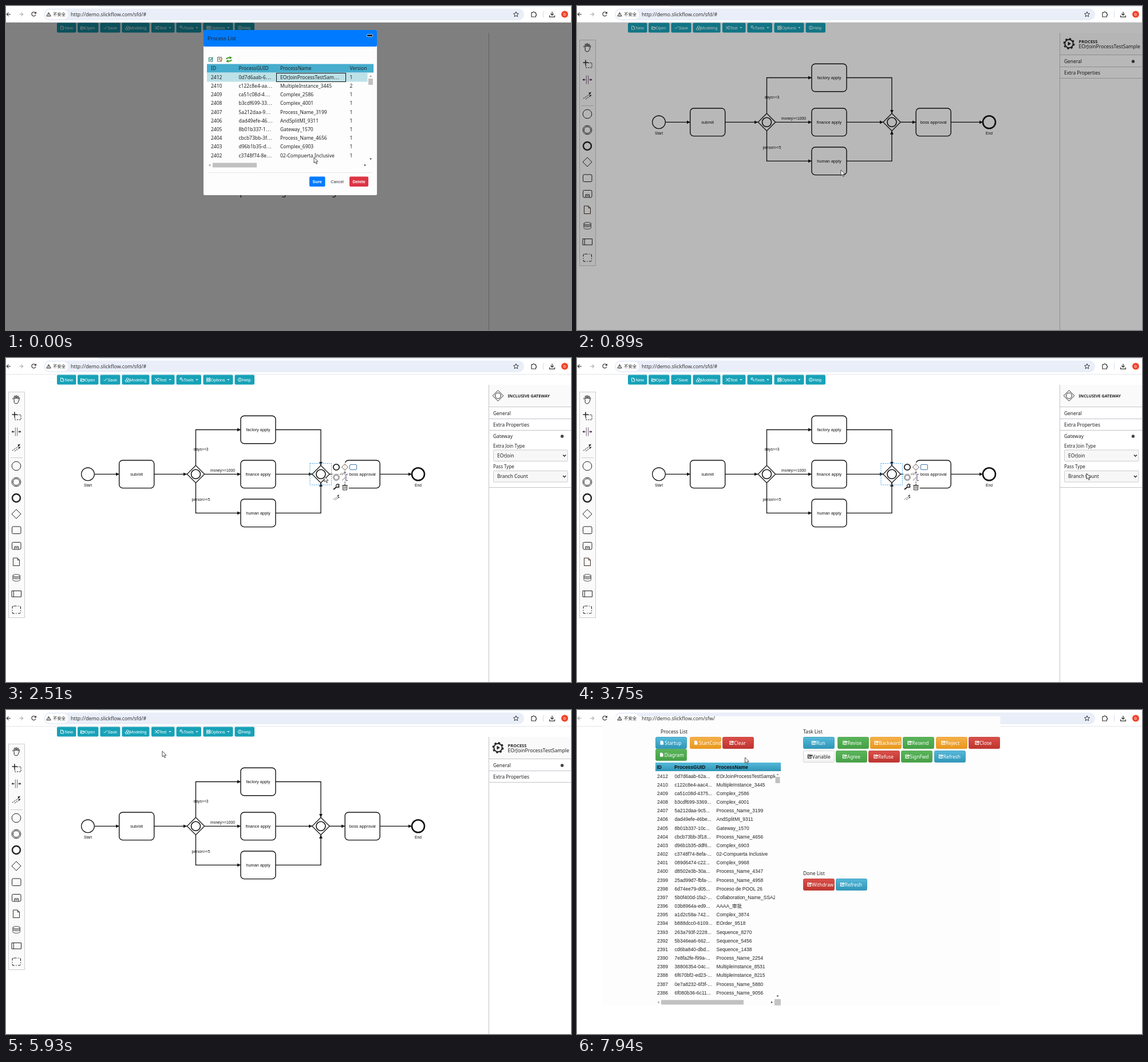
Write an HTML page that moves like this. It is 987 px wide and 567 px high and loops after 8 s.

```html
<!DOCTYPE html>
<html lang="en">
<head>
<meta charset="utf-8">
<title>Process designer</title>
<style>
html, body { margin: 0; width: 100%; height: 100%; overflow: hidden; background: #fff; }
#stage { display: block; width: 987px; height: 567px; }
text { font-family: "Noto Sans", "Noto Sans CJK SC", sans-serif; white-space: pre; }
.arial { font-family: "Liberation Sans", "Noto Sans CJK SC", Arial, sans-serif; }
</style>
</head>
<body>
<svg id="stage" viewBox="0 0 987 567"></svg>
<script>
const rect = (x, y, w, h, fill, more = '') =>
  `<rect x="${x}" y="${y}" width="${w}" height="${h}" fill="${fill}" ${more}/>`;
const path = (d, stroke = '#222', width = 1, fill = 'none', more = '') =>
  `<path d="${d}" stroke="${stroke}" stroke-width="${width}" fill="${fill}" ${more}/>`;
const solid = (d, fill = '#222') => path(d, 'none', 0, fill);
const ring = (x, y, r, width = 1, stroke = '#222', fill = 'none', more = '') =>
  `<circle cx="${x}" cy="${y}" r="${r}" stroke="${stroke}" stroke-width="${width}" fill="${fill}" ${more}/>`;
const text = (x, y, s, size = 8.4, fill = '#222', more = '') =>
  `<text x="${x}" y="${y}" font-size="${size}" fill="${fill}" ${more}>${s.replace(/>/g, '&gt;')}</text>`;
const arial = (x, y, s, size = 7.3, fill = '#222', more = '') =>
  text(x, y, s, size, fill, 'class="arial" ' + more);
const middle = 'text-anchor="middle"';
const group = (id, body, more = '') => `<g id="${id}" ${more}>${body}</g>`;
const at = (x, y, body) => `<g transform="translate(${x} ${y})">${body}</g>`;
const line = (color, d) => path(d, color, 1);
const diamond = (x, y, r, width) =>
  path(`M${x - r} ${y}L${x} ${y - r}L${x + r} ${y}L${x} ${y + r}Z`, '#222', width, '#fff');
const chevron = (x, y) => path(`M${x - 2.5} ${y - 1.5}l2.5 2.5l2.5 -2.5`, '#222', 1.4);
const tri = (x, y, dx, dy, fill = '#555') => // small arrow pointing along (dx, dy)
  solid(`M${x + dx * 2} ${y + dy * 2}L${x - dx - dy * 2} ${y - dy - dx * 2}L${x - dx + dy * 2} ${y - dy + dx * 2}Z`, fill);

// ---- browser bar
const urlText = id =>
  path('M74.500 11.300l3.600 6.400h-7.200z', '#222', 1) + path('M74.500 13.300v2.200M74.500 16.200v.7', '#222', .8) +
  text(82, 17.4, '不安全', 7.4) + text(113, 17.6, 'http://demo.slickflow.com/', 8.83, '#333') +
  text(223.5, 17.6, id, 8.83, '#333');
const reload = path('M51.600 12.200a3.600 3.600 0 1 0 .3 3.200M52.300 10.200v2.600h-2.600', '#333', 1.2);
const browser =
  rect(0, 0, 987, 29, '#fff') + rect(0, 28, 987, 1, '#e3e5e9') + rect(66, 4.5, 839, 20.5, '#e9eef8', 'rx="10"') +
  rect(68, 6.5, 40, 16.5, '#fff', 'rx="8"') +
  group('back', path('M8 14.500H1.500M4.500 11.300L1.300 14.500l3.200 3.200', 'currentColor', 1.2)) +
  path('M23 14.500h6.500M26.500 11.300l3.200 3.200l-3.200 3.200', '#aaa', 1.1) +
  path('M891 10l1.300 3l3.200.3l-2.400 2.100l.7 3.200l-2.800 -1.700l-2.800 1.700l.7 -3.200l-2.400 -2.100l3.200 -.3z', '#333', 1) +
  path('M918 11.500h2.300a1.500 1.500 0 0 1 3 0h2.200v2.500a1.300 1.300 0 0 1 0 2.600v2.400h-7.500z', '#333', 1.2) +
  rect(938, 9, 1, 11, '#cfdcf3') +
  path('M954 10v6M951.300 13.500l2.700 2.700l2.700 -2.700M949.500 16.500v2.700h9v-2.700', '#333', 1.2) +
  ring(976, 14.500, 6, 0, 'none', '#f2452c') + text(976, 17, 'b', 7, '#fff', middle);
const bars = group('barA', rect(162, 0, 825, 1, '#dbe6f8') + urlText('sfd/#') + reload) +
  group('barB', rect(0, 0, 162, 1, '#d3e3fd') + rect(307, 0, 680, 1, '#d3e3fd') + urlText('sfw/') +
    path('M45.500 11.500l6 6M51.500 11.500l-6 6', '#333', 1.2));

// ---- application toolbar
const toolIcons = [
  'M0 -3h3l2 2v4h-5zM3 -3v2h2', 'M0 3v-5h2l1 1h3v1M0 3l1.500 -3h5.500l-1.500 3z', 'M0 0l2 2l4 -4.500',
  'M3.500 -3l2 1v2l-2 1l-2 -1v-2zM1.500 0l2 1v2l-2 1l-2 -1v-2zM5.500 0l2 1v2l-2 1l-2 -1v-2z',
  'M0 -2h1.500l3 4h2M0 2h1.500l3 -4h2M5.500 -3l1.200 1l-1.200 1M5.500 1l1.200 1l-1.200 1',
  'M0 -1.500a1.500 1.500 0 0 0 2.500 1l3 3l1 -1l-3 -3a1.500 1.500 0 0 0 -2 -2l.5 1.500z',
  'M0 -3h2.500v2.500h-2.500zM3.800 -3h2.500v2.500h-2.500zM0 .7h2.500v2.500h-2.500zM3.800 .7h2.500v2.500h-2.500z',
  'M0 0a3 3 0 1 1 6 0a3 3 0 1 1 -6 0M3 -.5v2.300M3 -1.800v.8'];
const tools = [['New', 89, 33.5, 102.5], ['Open', 125, 36.5, 137.5], ['Save', 164.5, 35, 177.5],
  ['Modeling', 202.5, 48, 216], ['Test', 254, 40.5, 267, 286.5], ['Tools', 297.5, 43.5, 310.5, 333.5],
  ['Options', 344.5, 52, 357.5, 388.5], ['Help', 399.5, 34.5, 412.5]];
const toolbar = tools.map(([name, x, w, tx, caret], i) =>
  rect(x, 29.5, w, 17, '#17a2b8', `rx="2" id="tool${name}"`) +
  at(tx - 7, 38, path(toolIcons[i], '#fff', .9)) + arial(tx, 40.6, name, 7.3, '#fff') +
  (caret ? solid(`M${caret - 2} 37h4l-2 2.200z`, '#fff') : '')).join('');

// ---- process diagram
const task = (x, y, label) => rect(x - 30.5, y - 24.3, 61, 48.6, '#fff', 'rx="6.100" stroke="#111" stroke-width="1.400"') +
  arial(x, y + 2.5, label, 7.4, '#111', middle);
const gateway = x => diamond(x, 203.3, 15.2, 1.4) + ring(x, 203.3, 8, 1.6, '#111');
const label = (x, y, s) => arial(x, y, s, 6.7, '#111', middle);
const flows = ['M154.500 203.300H198', 'M258.500 203.300H316', 'M331.500 188V125.500H410', 'M346.700 203.300H410',
  'M331.500 218.500V271.300H410', 'M471 125.500H550V188', 'M471 203.300H535', 'M471 271.300H550V218.500',
  'M565 203.300H592', 'M653 203.300H709'];
const diagram = flows.map(d => path(d, '#111', 1.35, 'none', 'marker-end="url(#head)"')).join('') +
  ring(143, 203.3, 11.3, 1.3, '#111', '#fff') + ring(720, 203.3, 11, 2.6, '#111', '#fff') +
  task(228.2, 203.3, 'submit') + task(440.5, 125.5, 'factory apply') + task(440.5, 203.3, 'finance apply') +
  task(440.5, 271.3, 'human apply') + task(622.7, 203.3, 'boss approval') + gateway(331.5) + gateway(550) +
  label(340.7, 161.5, 'days>=3') + label(378.5, 198.7, 'money>=1000') + label(340.5, 249.5, 'person>=5') +
  label(143, 224.7, 'Start') + label(720, 224.7, 'End');

const connect = path('M-7 5L5 -3M-3 6L6 0', '#222', 1, 'none', 'stroke-dasharray="2.500 1"') +
  solid('M7 -6.500l-5 1.500l2.500 3zM7.500 -1.500l-4 .5l2 2.800z');
const palette = rect(4.5, 59.5, 28, 395, '#fafafa', 'stroke="#ccc"') + line('#ccc', 'M8 174.500h21') +
  at(18, 73, path('M-3.500 1l-2.500 -2.500c-1 -1 .5 -2 1.300 -1.200l2 1.700l-1.200 -4.500c0 -1.400 1.500 -1.400 1.800 -.3l1 3.800v-4.700c.2 -1.200 1.700 -1.200 1.800 0l.2 4.700l1.200 -4c.5 -1 1.700 -.7 1.600 .4l-.7 4.600l1.400 -2.400c.7 -.8 1.800 0 1.400 1l-2.300 6.400q-1 3 -4 3q-2.500 0 -3.500 -3z', '#222', 1)) +
  at(18, 101, path('M-3 -6.500v9M-7.500 -2h9', '#222', 1.5) + path('M1 -1.500H8V7H-2.500V2', '#222', 1, 'none', 'stroke-dasharray="2.500 1.500"')) +
  at(18, 129, path('M-1.700 -7.500v15M1.700 -7.500v15', '#7c5c7c', 1) + path('M-7 0h4M7 0h-4', '#222', 1.2) + tri(-6.5, 0, -1, 0, '#222') + tri(6.5, 0, 1, 0, '#222')) +
  at(18, 157, connect) + ring(18, 189, 7.8) + ring(18, 217, 7.8) + ring(18, 217, 5.8) + ring(18, 245, 7, 2.4) +
  path('M10 273l8 -8l8 8l-8 8z') + rect(10.5, 295, 15.5, 12.5, 'none', 'rx="2" stroke="#222"') +
  rect(10.5, 322.5, 15.5, 12.5, 'none', 'rx="2" stroke="#222"') + path('M15 334.500v-4.500h6.500v4.500M16.500 332.300h3.500') +
  path('M12.500 350h7.500l3.500 3.500v10h-11zM20 350v3.500h3.500', '#3a2a22') +
  path('M12 380.500a6.200 2 0 0 1 12.400 0v8a6.200 2 0 0 1 -12.400 0zM12 380.500a6.200 2 0 0 0 12.400 0M12 382.500a6.200 2 0 0 0 12.400 0M12 384.500a6.200 2 0 0 0 12.400 0', '#222', .8) +
  path('M10 407.500h16.500v10.500h-16.500zM13.300 407.500v10.500') +
  rect(11, 434, 14.5, 13, 'none', 'rx="2.500" stroke="#222" stroke-width="1.100" stroke-dasharray="5 2.300 1.500 2.300"');

const padTile = (x, y, body) => rect(x - 7, y - 8, 14, 16, '#fff', 'opacity=".85"') + at(x, y, body);
const outline = rect(531, 184.5, 37.5, 37.5, 'none', 'stroke="#4aa3e8" stroke-dasharray="2.200 1.500"');
const pad = padTile(577, 191, ring(0, 0, 5.2, 1.8)) + padTile(592, 191, path('M-5.500 0l5.500 -5.500l5.500 5.500l-5.500 5.500z', '#543', .9)) +
  padTile(606.5, 191, rect(-6, -4.5, 12, 9, '#fff', 'rx="1.500" stroke="#47a"')) +
  padTile(577, 209, ring(0, 0, 5.4, 1, '#777') + ring(0, 0, 3.9, 1, '#777')) +
  padTile(592, 209, path('M5 -5.500h-3v11h3', '#648', 1) + path('M-5 5l6 -5M-5 -5l3 -3M0 -10v4', '#222', 1, 'none', 'stroke-dasharray="1.500 1"')) +
  padTile(577, 226, path('M-5 4l5 -4', '#222', 2.2) + path('M5 -4a3 3 0 1 0 .3 3l-2.300 -.5z', '#222', 1.3)) +
  padTile(592, 226, path('M-3.500 -2.500h7v7.500h-7zM-5 -3h10M-1.500 -4.800h3M-1.200 -1v4.500M1.200 -1v4.500', '#222', .9)) +
  padTile(577, 244, `<g transform="scale(.75)">${connect}</g>`);

// ---- properties panel
const dot = y => ring(971.5, y, 2.7, 0, 'none', '#444');
const panelBase = rect(844, 47, 143, 520, '#fff') + rect(844, 47, 143, 38, '#fafafa') +
  line('#c4c4cc', 'M843.500 47V567M844 85.500H987M844 106.500H987M844 126.500H987') + text(851, 99.8, 'General') + text(851, 120, 'Extra Properties');
const bold = 'font-weight="700"';
const processPanel = ring(859.5, 66, 7.2, 2) + ring(859.5, 66, 8.9, 2, '#222', 'none', 'stroke-dasharray="3.500 3.490"') +
  solid('M857.500 62.500v7l5.500 -3.500z') + text(876.5, 65, 'PROCESS', 7.5, '#222', bold) +
  text(876.5, 74.3, 'EOrJoinProcessTestSample', 8.6) + dot(97);
const select = (y, s) => rect(851.5, y, 129.5, 19.5, '#f7f7f7', 'rx="1" stroke="#ccc"') +
  text(858, y + 12.8, s) + chevron(975.5, y + 10);
const gatewayPanel = diamond(859.5, 66, 9.3, 1) + ring(859.5, 66, 5) + text(876.5, 68.8, 'INCLUSIVE GATEWAY', 7.2, '#222', bold) +
  text(851, 140, 'Gateway') + dot(137) + text(851, 157, 'Extra Join Type', 8) + select(161, 'EOrJoin') +
  text(851, 193.3, 'Pass Type', 8) + select(197.5, 'Branch Count') + line('#c4c4cc', 'M844 226.500H987');
const options = rect(851.5, 197.5, 129.5, 19.5, '#e3f0fb', 'stroke="#4aa0d8"') + text(858, 210.3, 'Branch Count') + chevron(975.5, 207.5) +
  rect(852, 218, 131, 52, '#000', 'opacity=".12"') + rect(851.5, 217.5, 129.5, 51, '#e5f1fb', 'stroke="#567"') +
  rect(852, 234.5, 128.5, 17, '#0a63d3') + text(858, 229.3, '--Choose--') +
  text(858, 246.3, 'Branch Count', 8.4, '#fff') + text(858, 263.2, 'Branch Forced');

const menu = rect(254.5, 48.5, 72, 48.5, '#fff', 'rx="2" stroke="#ddd"') + rect(255, 52, 71, 14.500, '#e9ecef', 'id="menuHover"') +
  line('#e6e6e6', 'M255 72.500h71') + arial(265, 62, 'Simulation Test', 7.25) + arial(265, 88, 'Demo »', 7.25);

// ---- process table shared by the dialog and the test page
const rows = `0d7d6aab-62a EOrJoinProcessTestSample|c122c8e4-aac4 MultipleInstance_3445|ca51c08d-4375 Complex_2586
b3cdf699-3369 Complex_4001|5a212daa-9c5 Process_Name_3199|dad49efe-46be AndSplitMI_9311|8b01b337-10c Gateway_1570
cbcb73bb-3f18 Process_Name_4656|d96b1b35-ddf6 Complex_6903|c3748f74-8efa- 02-Compuerta Inclusive|089d6474-c22 Complex_9968
d8502e3b-30a Process_Name_4347|25ad99d7-fbfa- Process_Name_4958|6d74ee79-d05 Proceso de POOL 26
5b0f400d-1fa2- Collaboration_Name_SSAZ|03b8964a-ed9 AAAA_审批|a1d2c58a-742 Complex_3874|b888dcc0-6109 EOrder_9518
263a793f-2228 Sequence_8270|5b346ea6-662 Sequence_5456|cd6ba840-dbd Sequence_1438|7e8fa2fe-f99a- Process_Name_2254
38806354-04c MultipleInstance_8531|6f670bf2-ed23- MultipleInstance_8215|0e7a8232-6f3f- Process_Name_5880
6f080b36-6c11 Process_Name_9056`.split(/[|\n]/).map((row, i) => {
  const gap = row.indexOf(' ');
  return { id: String(i ? 2411 - i : 2412), guid: row.slice(0, gap), name: row.slice(gap + 1) };
});
const shortGuid = i => rows[i].guid.slice(0, [1, 3, 5, 7, 9].includes(i) ? 11 : 10) + '⋯';
const dialogRow = (r, i) => {
  const y = 127.8 + i * 15.2;
  return text(358, y, r.id, 8.5) + text(406.5, y, shortGuid(i), 8.5) +
    text(479, y, i ? r.name : 'EOrJoinProcessTestSam⋯', 8.5) + text(600.5, y, i === 1 ? '2' : '1', 8.5);
};
const dialog = rect(345, 42, 303, 289, '#fdfdfd', 'rx="2"') + rect(345, 42, 303, 29, '#007bff', 'rx="2"') +
  text(352, 59.6, 'Process List', 9.1, '#212529') + rect(630.5, 49.8, 10, 3.8, '#111', 'rx="1" stroke="#fff" stroke-width=".800"') +
  path('M354.500 90.500h6v6.500h-6zM356 93l1.500 2l4 -5.500', '#2a8a78', 1.2) +
  path('M369.500 89.500h7v7.500h-7zM371 91.500h4M371 93.500h3', '#667', 1) + path('M374 96l4 -4', '#d9902a', 1.8) +
  path('M385 93q1 -3 6 -2.500M394 94q-1 3 -6 2.500', '#43a02a', 2) + solid('M390 88l5 2l-4 3.500zM389 99l-5 -2l4 -3.500z', '#43a02a') +
  rect(351, 101.500, 291, 15, '#46adce') +
  [['ID', 358], ['ProcessGUID', 406.5], ['ProcessName', 479], ['Version', 600.5]].map(([s, x]) => text(x, 112.3, s, 8.5)).join('') +
  rect(351, 117, 280.5, 15.5, '#bce1e7') + rows.slice(0, 10).map(dialogRow).join('') +
  rect(472.5, 117.5, 121, 15, 'none', 'stroke="#111"') +
  tri(637, 123, 0, -1, '#999') + rect(633, 127, 8, 11, '#c1c1c1') + tri(637, 267.5, 0, 1) +
  tri(356, 278.5, -1, 0, '#999') + rect(361, 274.500, 77, 8, '#c1c1c1') + tri(627, 278.5, 1, 0) + line('#e3e6e9', 'M352 291.500H640') +
  rect(530, 298.500, 27.5, 17.5, '#007bff', 'rx="2"') + arial(543.7, 309.8, 'Sure', 7.3, '#fff', middle + bold) +
  arial(578.5, 309.8, 'Cancel', 7.3, '#333', middle) +
  rect(600, 298.500, 33, 17.5, '#dc3545', 'rx="2"') + arial(616.5, 309.8, 'Delete', 7.3, '#fff', middle + ' ' + bold);

// ---- test page
const tones = { blue: ['#55b9da', '#2f96b8'], green: ['#5ab55a', '#46a046'], amber: ['#f5b04a', '#e8971c'], red: ['#db4f4a', '#bd342e'], plain: ['#fff', '#f2f2f2'] };
const gradients = Object.entries(tones).map(([name, [a, b]]) =>
  `<linearGradient id="${name}" x2="0" y2="1"><stop stop-color="${a}"/><stop offset="1" stop-color="${b}"/></linearGradient>`).join('');
const pageButton = (x, y, tone, name, inset, file) => {
  const ink = tone === 'plain' ? '#222' : '#fff';
  const icon = file ? solid('M0 -3.500h3.500l2 2v5h-5.500z', ink)
    : path('M4 -2.500h-3.500v5.500h5.500v-2', ink, 1.2) + path('M2.500 1q.5 -2.500 3 -2.500', ink, 1.4) + solid('M5 -4l3 2.500l-3 2.500z', ink);
  return `<svg x="${x}" y="${y}" width="55" height="21">` +
    rect(.5, .5, 54, 20, `url(#${tone})`, `rx="2" stroke="${tone === 'plain' ? '#ccc' : tones[tone][1]}" stroke-width=".800"`) +
    at(inset, 10.2, icon) + text(inset + 7.8, 13.7, name, 8.4, ink, 'font-weight="500"') + '</svg>';
};
const pageRow = (r, i) => {
  const y = 118.5 + i * 15.17;
  return arial(140, y, r.id, 8.5) + arial(170.5, y, r.guid + '...', 8.5) + arial(243.5, y, r.name, 8.5, '#222', 'clip-path="url(#cells)"');
};
const page = rect(45, 11, 694.5, 506, '#fdfdfd') + urlText('sfw/') + reload +
  text(146, 41.3, 'Process List', 8.6) + text(395, 41.3, 'Task List', 8.6) + text(395, 288.8, 'Done List', 8.6) +
  [[137, 47, 'blue', 'Startup', 8.5, 1], [197, 47, 'amber', 'StartCond', 8, 1], [254, 47, 'red', 'Clear', 12.5],
    [137, 68, 'green', 'Diagram', 8, 1], [395, 47, 'blue', 'Run', 15], [455, 47, 'green', 'Revise', 9.5],
    [512, 47, 'amber', 'Backward', 7.5], [569, 47, 'green', 'Resend', 8.5], [627, 47, 'amber', 'Reject', 9.5],
    [684, 47, 'red', 'Close', 11.5], [395, 71, 'plain', 'Variable', 8], [452, 71, 'green', 'Agree', 12],
    [509, 71, 'red', 'Refuse', 9.5], [566, 71, 'green', 'SignFwd', 7.5], [624, 71, 'blue', 'Refresh', 8],
    [395, 295, 'red', 'Withdraw', 7.5], [452, 295, 'blue', 'Refresh', 8]].map(b => pageButton(...b)).join('') +
  rect(137, 92, 219, 15, 'url(#blue)') +
  [['ID', 139.5], ['ProcessGUID', 170], ['ProcessName', 242.5]].map(([s, x]) => arial(x, 102.6, s, 8.5, '#111', bold)).join('') +
  rows.map(pageRow).join('') +
  tri(350.5, 113, 0, -1, '#999') + rect(346.5, 117, 8, 11, '#c1c1c1') + tri(350.5, 500.5, 0, 1) +
  tri(142.5, 511.5, -1, 0, '#999') + rect(147, 507.5, 144, 8, '#c1c1c1') + tri(340, 511.5, 1, 0) + rect(345, 506, 11, 11, '#c4c4c4');

const arrow = path('M0 0V9.800L2.300 7.700L4 11.500L5.600 10.800L4 7.200H7Z', '#222', .8, '#fff');
const hand = path('M-1 6V1a1 1 0 0 1 2 0v3.500l1.500 .2l1.500 .4l1.500 .5v3.500l-1.200 4h-5l-3.300 -5c-.4 -1 .6 -1.600 1.400 -.9z', '#222', .9, '#fff');

const stage = document.getElementById('stage');
stage.innerHTML = `<defs>${gradients}<clipPath id="cells"><path d="M137 92H346V506H137z"/></clipPath>
  <marker id="head" markerUnits="userSpaceOnUse" markerWidth="8" markerHeight="8" refX="6.200" refY="4" orient="auto"><path d="M0 1L6.200 4L0 7Z" fill="#111"/></marker></defs>` +
  rect(0, 0, 987, 567, '#fff') + browser + bars +
  group('app', toolbar + line('#c4c4cc', 'M843.500 47V567') +
    group('hint', text(496.5, 330.6, 'create a process diagram here to get started', 13.7, '#222', middle)) +
    group('model', diagram + palette + panelBase) + group('process', processPanel) + group('outline', outline) +
    group('gateway', pad + gatewayPanel) + group('options', options) + group('menu', menu) +
    rect(0, 29, 987, 538, '#000', 'id="shade"') + group('dialog', dialog)) +
  group('page', page) + group('arrow', arrow) + group('hand', hand);

// ---- timeline
const LOOP = 8000;
const pointer = [[0, 538, 265], [120, 540, 282], [250, 542, 301], [630, 543, 303], [760, 534, 299], [890, 461, 287],
  [1020, 364, 287], [1140, 342, 290], [1290, 290, 303], [1420, 267, 314], [1720, 277, 308], [1850, 360, 272],
  [1980, 490, 226], [2110, 581, 205], [2230, 556, 207], [2640, 575, 210], [2770, 650, 222], [2890, 745, 236],
  [3020, 820, 225], [3150, 862, 190], [3340, 884, 158], [3470, 888, 145], [3620, 889, 172], [3750, 890, 202],
  [4150, 890, 214], [4280, 891, 228], [4430, 891, 236], [4700, 891, 238], [5260, 868, 260], [5390, 765, 296],
  [5530, 652, 320], [5670, 640, 312], [5790, 450, 190], [5930, 273, 72], [6210, 273, 52], [6340, 274, 37],
  [6730, 281, 50], [6860, 285, 58], [7130, 286, 62], [7540, 291, 74], [7670, 293, 81], [7800, 293.5, 83]];
const node = id => document.getElementById(id);
const show = (id, on) => { node(id).style.display = on ? '' : 'none'; };

function draw(t) {
  const within = (from, to) => t >= from && t < to;
  const newTab = t >= 7540, picked = within(2510, 5670);
  show('app', !newTab);
  show('barA', !newTab);
  show('barB', within(7540, 7940));
  show('page', t >= 7940);
  node('back').style.color = newTab ? '#aaa' : '#333';
  show('hint', t < 630);
  show('model', t >= 630);
  show('process', t >= 630 && !picked);
  show('outline', within(2110, 5670));
  show('gateway', picked);
  show('options', within(4010, 5110));
  show('menu', t >= 6470);
  show('menuHover', t >= 6860);
  node('toolTest').setAttribute('fill', t >= 6470 ? '#117a8b' : t >= 6340 ? '#138496' : '#17a2b8');
  node('shade').setAttribute('opacity', t < 890 ? .5 : t < 1020 ? .28 : 0);
  show('dialog', t < 760);
  node('dialog').setAttribute('opacity', t < 630 ? 1 : .4);
  node('dialog').setAttribute('transform', `translate(0 ${t < 630 ? 0 : -18})`);
  const [, x, y] = pointer.filter(p => p[0] <= t).pop();
  const pointing = within(250, 760) || within(6340, 7540);
  show('arrow', !pointing);
  show('hand', pointing);
  node(pointing ? 'hand' : 'arrow').setAttribute('transform', `translate(${x} ${y})`);
}

const start = performance.now();
function tick() {
  draw((performance.now() - start) % LOOP);
  requestAnimationFrame(tick);
}
tick();
</script>
</body>
</html>
```
